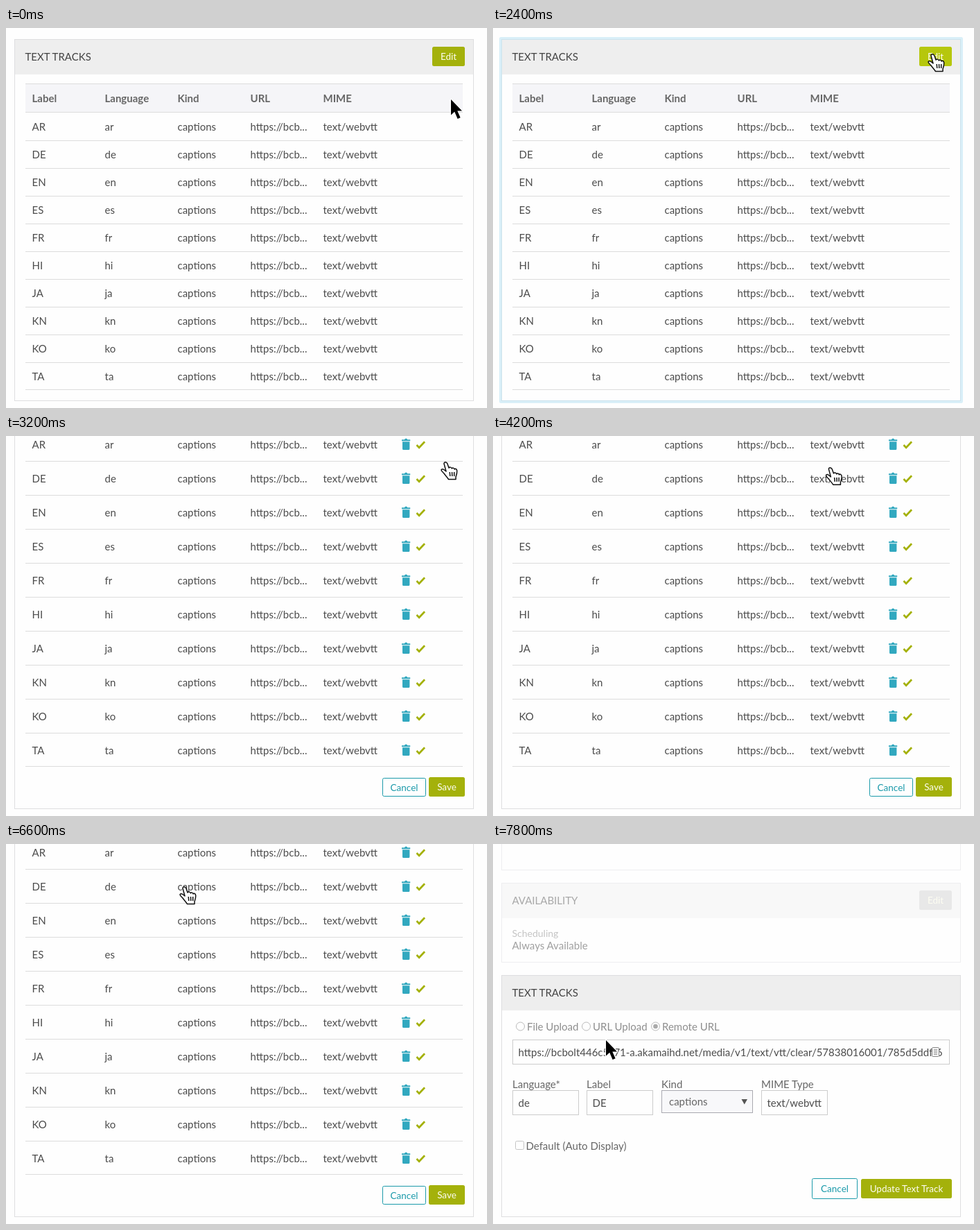
Animation of 694 by 548 pixels, one loop 8000 ms. Source, as an HTML page:

```html
<!DOCTYPE html>
<html lang="en">
<head>
<meta charset="utf-8">
<title>Text tracks</title>
<style>
  html, body { margin: 0; width: 100%; height: 100%; overflow: hidden; background: #fefefe; }
  svg { display: block; width: 694px; height: 548px; }
  text { font: 15px Lato, sans-serif; fill: #4c4c4c; white-space: pre; }
  .head { font-weight: bold; fill: #666; }
  .label { fill: #666; }
  .dim { fill: #8e8e8e; }
  .btn { font-size: 13.5px; text-anchor: middle; }
</style>
</head>
<body>
<svg id="stage" viewBox="0 0 694 548"></svg>
<script>
const LOOP = 8000, STEP = 200;
const HOVER_AT = 1800, EDIT_AT = 3200, FORM_AT = 7000;
const GREEN = '#a4b10b', TEAL = '#1b9aaa', RULE = '#dcdcdc';
const COLUMNS = [37.5, 142.5, 247.5, 352.5, 457.5];
const LANGUAGES = 'ar de en es fr hi ja kn ko ta'.split(' ');

const text = (x, y, s, cls = '', extra = '') => `<text x="${x}" y="${y}" class="${cls}" ${extra}>${s}</text>`;
const fill = (x, y, w, h, color, r = 0, extra = '') =>
  `<rect x="${x}" y="${y}" width="${w}" height="${h}" rx="${r}" fill="${color}" ${extra}/>`;
// Outlined box given by its outer pixel edges.
const box = (x, y, x2, y2, stroke = '#ccc', r = 0, bg = '#fefefe') =>
  fill(x + .5, y + .5, x2 - x - 1, y2 - y - 1, bg, r, `stroke="${stroke}"`);
const rule = y => fill(28, y, 631, 1, RULE);
const button = (x, y, x2, y2, s, color = GREEN, id = '') =>
  fill(x, y, x2 - x, y2 - y, color, 2.5, id && `id="${id}"`) +
  text((x + x2) / 2, y + 19, s, 'btn', 'style="fill:#fdfdf2"');
const cancel = (x, y, x2, y2, base) =>
  box(x, y, x2, y2, TEAL, 2) + text((x + x2) / 2, base, 'Cancel', 'btn', `style="fill:${TEAL}"`);
const card = (y, y2, title, border = '#dedee0', bar = '#eee', ink = '#444') =>
  box(12, y, 675, y2, border) + fill(13, y + 1, 661, 50, bar) +
  text(27.5, y + 31, title, '', `style="fill:${ink}"`);
const cells = (lang, y) =>
  [lang.toUpperCase(), lang, 'captions', 'https://bcb...', 'text/webvtt']
    .map((s, i) => text(COLUMNS[i], y, s)).join('');

function tableView() {
  const heads = ['Label', 'Language', 'Kind', 'URL', 'MIME'];
  return card(16, 538, 'TEXT TRACKS') + button(615, 27, 662, 55, 'Edit', GREEN, 'edit') +
    fill(28, 80, 631, 42, '#f5f5f8') + rule(80) + rule(121) +
    heads.map((s, i) => text(COLUMNS[i], 107, s, 'head')).join('') +
    LANGUAGES.map((lang, i) => cells(lang, 148 + 40 * i) + rule(i < 9 ? 162 + 40 * i : 521)).join('');
}

function editView() {
  const icons = y => `<g transform="translate(0 ${y})">
    <path d="M571 5.2h4l.8-1.5h2.6l.8 1.5h4v2h-12.2zM572 8.2h10.4v10.3q0 1.5-1.5 1.5h-7.4q-1.5 0-1.5-1.5z" fill="#31a8bf"/>
    <path d="M592.5 13l3.6 3.7 8-8.5" fill="none" stroke="${GREEN}" stroke-width="2.7"/></g>`;
  return box(12, -10, 675, 538, '#dedee0') +
    LANGUAGES.map((lang, i) =>
      cells(lang, 18 + 49 * i) + icons(49 * i) + rule(i < 9 ? 36 + 49 * i : 476)).join('') +
    cancel(543, 493, 606, 520, 512) + button(610, 492, 662, 520, 'Save');
}

function formView() {
  const radio = (x, s, on) =>
    `<circle cx="${x}" cy="263" r="6" fill="#fefefe" stroke="#bbb"/>` +
    (on ? `<circle cx="${x}" cy="263" r="3.3" fill="#aaa"/>` : '') + text(x + 9.5, 269, s, 'dim');
  const field = (x, label, value) =>
    text(x, 352, label, 'label') + box(x, 355, x + 96, 391) + text(x + 8.5, 379, value);
  const url = 'https://bcbolt446c5c71-a.akamaihd.net/media/v1/text/vtt/clear/57838016001/785d5ddf-6';
  return box(12, -10, 675, 38, '#eeeef0') +
    card(56, 171, 'AVAILABILITY', '#eeeef0', '#f8f8f8', '#a8a8a8') +
    button(615, 67, 662, 95, 'Edit', '#e8e8e8') +
    text(27.5, 134, 'Scheduling', '', 'style="font-size:14px;fill:#c4c4c4"') +
    text(27.5, 152, 'Always Available', '', 'style="fill:#a0a0a0"') +
    card(189, 538, 'TEXT TRACKS') +
    radio(39.5, 'File Upload') + radio(134.5, 'URL Upload') + radio(234.5, 'Remote URL', true) +
    box(28, 282, 659, 318) +
    '<clipPath id="urlClip"><rect x="36" y="284" width="614" height="32"/></clipPath>' +
    text(36.5, 306, url, '', 'clip-path="url(#urlClip)"') +
    box(633, 293, 644, 307, '#888', 1, '#f4f4f4') +
    '<path d="M636 297h5M636 300h5M636 303h5" stroke="#777"/>' +
    field(28, 'Language*', 'de') + field(135, 'Label', 'DE') + field(387, 'MIME Type', 'text/webvtt') +
    text(243, 352, 'Kind', 'label') + box(243, 355, 375, 388, '#a9a9b0', 0, '#f8f8fa') +
    text(254, 377, 'captions', 'label') + '<path d="M358.5 368h8.5l-4.25 7.5z" fill="#555"/>' +
    box(32, 428, 45, 441, '#c4c4c4', 2) + text(47.5, 441, 'Default (Auto Display)', 'label') +
    cancel(460, 482, 526, 512, 502) + button(531, 483, 662, 511, 'Update Text Track');
}

const arrow = `<path d="M0 0V22.5L5.2 17.8L9.6 28L13.6 26.2L9.3 16.4H16Z" fill="#000"
  stroke="#fff" stroke-width="2.4" paint-order="stroke" stroke-linejoin="round"/>`;
const hand = `<g transform="translate(-7 -1)" stroke="#111" stroke-width="1.5" stroke-linejoin="round">
  <path fill="#fff" d="M8 14L5 3C4.600 .2 8.800 0 9.800 2.800L12 9C13 7.300 16 8 16.300 10C17.200 8.300 19.700 9 20 11
    C21 9.500 23.500 10.500 23.700 13C24 17 23 19 22 22V25.500H11.500C10 23 7 20 5 17C3 15 1 13.500 1 12C1.500 10 4 10.500 5.500 12Z"/>
  <path d="M13.200 15l.6 6M16.500 15l.3 6M19.700 15v6"/></g>`;

const stage = document.getElementById('stage');
stage.innerHTML = `<g id="table">${tableView()}</g><g id="editing">${editView()}</g><g id="form">${formView()}</g>
  <g id="glow" fill="none"><rect x="10.500" y="14.500" width="666" height="525" rx="1" stroke="#d9eff8" stroke-width="3"/>
  <rect x="12.500" y="16.500" width="662" height="521" stroke="#cbe2ec"/></g>
  <g id="cursor"><g id="arrow">${arrow}</g><g id="hand">${hand}</g></g>`;
const part = id => document.getElementById(id);
const show = (id, on) => { part(id).style.display = on ? '' : 'none'; };

// Pointer hot spot: time, x, y
const PATH = [[0, 642, 103], [1200, 635, 36], [1600, 635, 36], [1800, 634, 38], [3600, 634, 38],
  [5000, 259, 58], [6600, 257, 62], [7000, 257, 62], [7800, 163, 283], [8000, 163, 283]];

function pointerAt(t) {
  const i = PATH.findIndex((key, n) => n && t < key[0]);
  const [t0, x0, y0] = PATH[i - 1], [t1, x1, y1] = PATH[i];
  const u = (t - t0) / (t1 - t0), ease = u * u * (3 - 2 * u);
  return [x0 + (x1 - x0) * ease, y0 + (y1 - y0) * ease];
}

function draw(now) {
  const t = Math.floor(now % LOOP / STEP) * STEP;
  const hover = t >= HOVER_AT && t < EDIT_AT;
  const pointing = t >= HOVER_AT && t < FORM_AT;
  show('table', t < EDIT_AT);
  show('editing', t >= EDIT_AT && t < FORM_AT);
  show('form', t >= FORM_AT);
  show('glow', hover);
  show('hand', pointing);
  show('arrow', !pointing);
  part('edit').setAttribute('fill', hover ? '#b6c70c' : GREEN);
  part('cursor').setAttribute('transform', `translate(${pointerAt(t)})`);
}

const start = performance.now();
function tick() {
  draw(performance.now() - start);
  requestAnimationFrame(tick);
}
tick();
</script>
</body>
</html>
```
